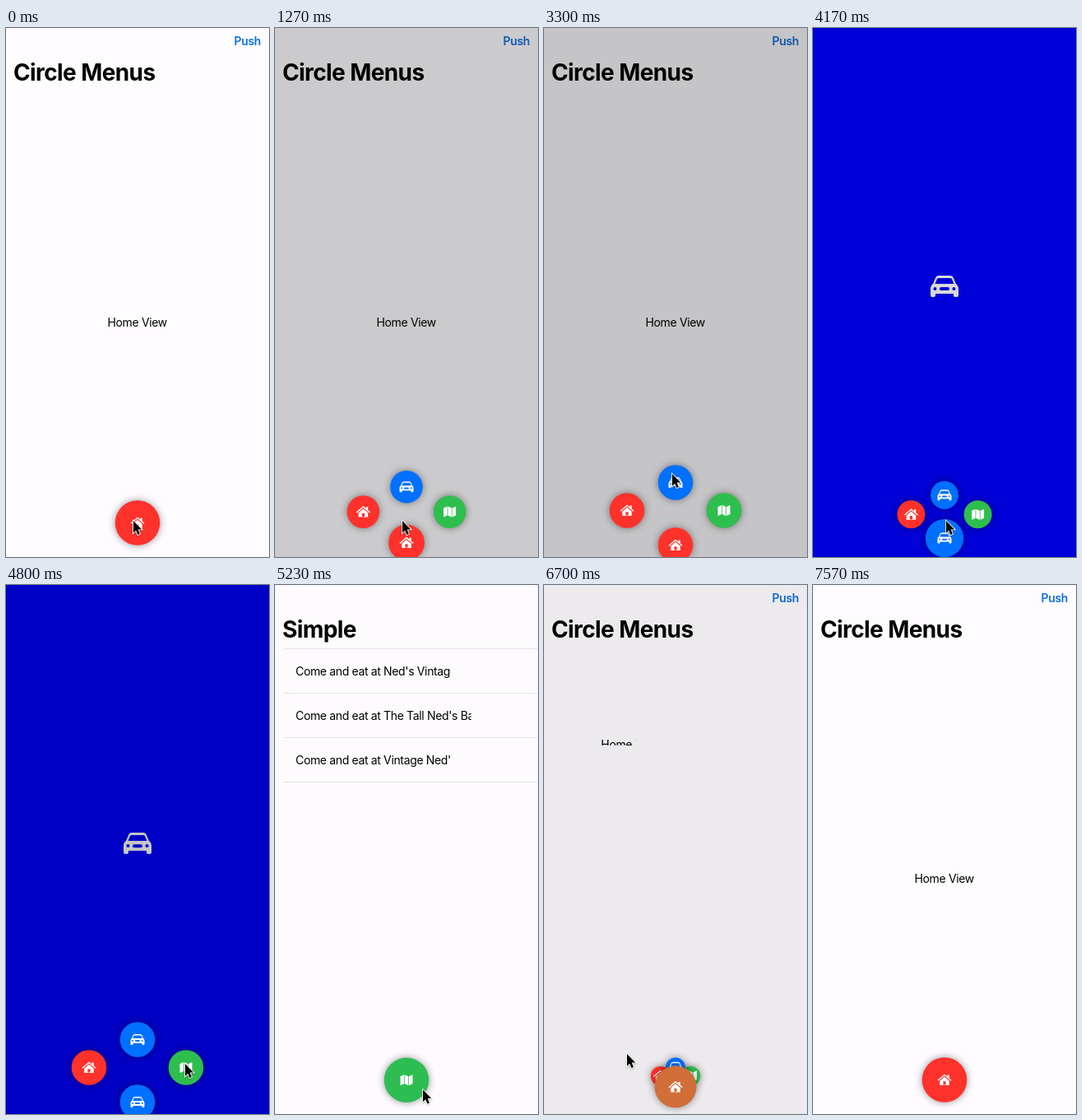
An HTML page with a canvas for the animation above (7.86 s loop, 320 px wide and 643 px high).

```html
<!DOCTYPE html>
<html lang="en">
<head>
<meta charset="utf-8">
<title>Circle Menus</title>
<style>
html, body { margin: 0; width: 100%; height: 100%; overflow: hidden; background: #fefcff; }
canvas { display: block; }
</style>
</head>
<body>
<canvas id="stage" width="320" height="643"></canvas>
<script>
const ctx = document.getElementById('stage').getContext('2d');
const LOOP = 7860;
const FONT = 'Inter, "Liberation Sans", sans-serif';
const PAPER = '#fefcff';

// Icons are centred on the origin and about 34 units wide.
const icons = {
  house: new Path2D('M-17 0.5 L0-14 L7-8 V-12 H11.5 V-4.2 L17 0.5 L15.2 2.6 L0-10.4 L-15.2 2.6Z' +
    'M-11.5 2.5 L0-7.3 L11.5 2.5 V13 H-11.5Z M-3.2 12 V3.5 H3.2 V12Z'),
  car: new Path2D('M-17 2 Q-17-1-14-3 L-11-10 Q-10-13-7-13 H7 Q10-13 11-10 L14-3 Q17-1 17 2' +
    'V11 Q17 13 15 13 H13 Q11 13 11 11 V9 H-11 V11 Q-11 13-13 13 H-15 Q-17 13-17 11Z' +
    'M-11.5-3 L-9-9 Q-8.5-10-7-10 H7 Q8.5-10 9-9 L11.5-3Z' +
    'M-13.5 3 a2 2 0 1 0 4 0 a2 2 0 1 0-4 0Z M9.5 3 a2 2 0 1 0 4 0 a2 2 0 1 0-4 0Z' +
    'M-4 1.2 H4 a2 2 0 0 1 0 4 H-4 a2 2 0 0 1 0-4Z'),
  map: new Path2D('M-15-9 L-6-13 V9 L-15 13Z M-4.5-13 L4.5-9 V13 L-4.5 9Z M6-9 L15-13 V9 L6 13Z')
};
const arrow = new Path2D('M0 0 V16.5 L3.8 13 L6.4 19 L9.3 17.7 L6.7 11.8 L12 11.6Z');

const items = [
  { icon: 'house', color: [255, 50, 43], dx: -59, dy: -15 },
  { icon: 'car', color: [0, 112, 255], dx: 0, dy: -49 },
  { icon: 'map', color: [46, 190, 78], dx: 59, dy: -15 }
];

// Each tap either opens the menu or picks a view.
const taps = [
  { at: 1034 }, { at: 3320, view: 1 },
  { at: 4022 }, { at: 4825, view: 2 },
  { at: 5700 }, { at: 6552, view: 0 }
];

// Pointer path: time, x, y
const pointer = [
  [0, 155, 599], [2500, 155, 599], [3000, 156, 542], [3400, 156, 542],
  [3850, 162, 599], [4200, 162, 599], [4650, 218, 582], [4900, 218, 582],
  [5230, 180, 613.5], [5500, 159, 601], [5750, 159, 601], [6300, 101, 570],
  [6750, 101, 570], [7150, 40, 665], [LOOP, 40, 665]
];

const spring = (ms, rate) => {
  const x = Math.max(0, ms) / 1000 * rate;
  return 1 - (1 + x) * Math.exp(-x);
};

const blend = (a, b, k) => a.map((v, i) =>
  Math.round((v ** 1.8 * (1 - k) + b[i] ** 1.8 * k) ** (1 / 1.8)));

function stateAt(t) {
  const s = { open: 0, view: 0, previous: 0, swap: 1, settle: 1 };
  for (const tap of taps) {
    if (t < tap.at) break;
    const k = spring(t - tap.at, 16);
    if (tap.view === undefined) {
      s.open = k;
      s.swap = 1;
    } else {
      s.open = 1 - k;
      s.swap = k;
      s.previous = s.view;
      s.view = tap.view;
      s.settle = spring(t - tap.at, 12.6);
    }
  }
  return s;
}

function text(str, x, y, { size = 14, weight = 400, gap = -0.35, color = '#000', align = 'left' } = {}) {
  ctx.font = `${weight} ${size}px ${FONT}`;
  ctx.letterSpacing = gap + 'px';
  ctx.textAlign = align;
  ctx.fillStyle = color;
  ctx.fillText(str, x, y);
}

// Text whose frame is still growing towards its full size
function growingText(str, x, y, w, h, baseline) {
  ctx.save();
  ctx.beginPath();
  ctx.rect(x, y, w, h);
  ctx.clip();
  text(str, x, y + baseline);
  ctx.restore();
}

function icon(name, x, y, scale, color = '#fff') {
  ctx.save();
  ctx.translate(x, y);
  ctx.scale(scale, scale);
  ctx.fillStyle = color;
  ctx.fill(icons[name], 'evenodd');
  ctx.restore();
}

function fill(color) {
  ctx.fillStyle = color;
  ctx.fillRect(0, 0, 320, 643);
}

const title = str => text(str, 9, 64, { size: 28, weight: 700, gap: -0.6 });

const views = [
  q => {
    fill(PAPER);
    title('Circle Menus');
    text('Push', 310, 21, { weight: 600, color: '#0f70e0', align: 'right' });
    growingText('Home View', 123 * q + 0.5, 372 * q - 24.5, 75 * q, 20 * q, 15);
  },
  q => {
    fill('#00f');
    icon('car', 160 * q, 338 * q - 24, 1);
  },
  q => {
    fill(PAPER);
    title('Simple');
    ctx.fillStyle = '#e6e4e7';
    for (let i = 0; i < 4; i++) ctx.fillRect(10, 77 + 54 * i, 310, 1);
    ["Ned's Vintage", "The Tall Ned's Bar", "Vintage Ned's"].forEach((name, i) => {
      const full = 'Come and eat at ' + name;
      ctx.font = `400 14px ${FONT}`;
      ctx.letterSpacing = '-0.35px';
      const width = ctx.measureText(full).width;
      growingText(full, 25, 95 + 54 * i, width * q, 20, 15);
    });
  }
];

function disc(x, y, r, color, name) {
  ctx.save();
  ctx.shadowColor = 'rgba(0,0,0,.42)';
  ctx.shadowBlur = 10;
  ctx.fillStyle = `rgb(${color})`;
  ctx.beginPath();
  ctx.arc(x, y, r, 0, Math.PI * 2);
  ctx.fill();
  ctx.restore();
  icon(name, x, y, 0.5);
}

function menu({ open, view, previous, swap }) {
  if (open > 0.01) {
    for (const i of [0, 2, 1]) {
      const { dx, dy, color, icon: name } = items[i];
      disc(160 + dx * open, 601.5 + dy * open, 7.5 + 13.8 * open, color, name);
    }
  }
  const color = blend(items[previous].color, items[view].color, swap);
  disc(160, 601.5 + 27 * open, 27.3 - 6 * open, color, items[view].icon);
}

function cursor(t) {
  const i = pointer.findIndex(p => p[0] > t);
  const [t0, x0, y0] = pointer[i - 1], [t1, x1, y1] = pointer[i];
  const u = (t - t0) / (t1 - t0), k = u * u * (3 - 2 * u);
  ctx.save();
  ctx.translate(x0 + (x1 - x0) * k, y0 + (y1 - y0) * k);
  ctx.scale(0.85, 0.9);
  ctx.shadowColor = 'rgba(0,0,0,.3)';
  ctx.shadowBlur = 2;
  ctx.shadowOffsetY = 1;
  ctx.strokeStyle = '#fff';
  ctx.lineWidth = 2;
  ctx.stroke(arrow);
  ctx.shadowColor = 'transparent';
  ctx.fillStyle = '#000';
  ctx.fill(arrow);
  ctx.restore();
}

const start = performance.now();

function draw() {
  const t = (performance.now() - start) % LOOP;
  const state = stateAt(t);
  views[state.view](state.settle);
  fill(`rgba(0,0,0,${(0.225 * state.open).toFixed(4)})`);
  menu(state);
  cursor(t);
  requestAnimationFrame(draw);
}
draw();
</script>
</body>
</html>
```
